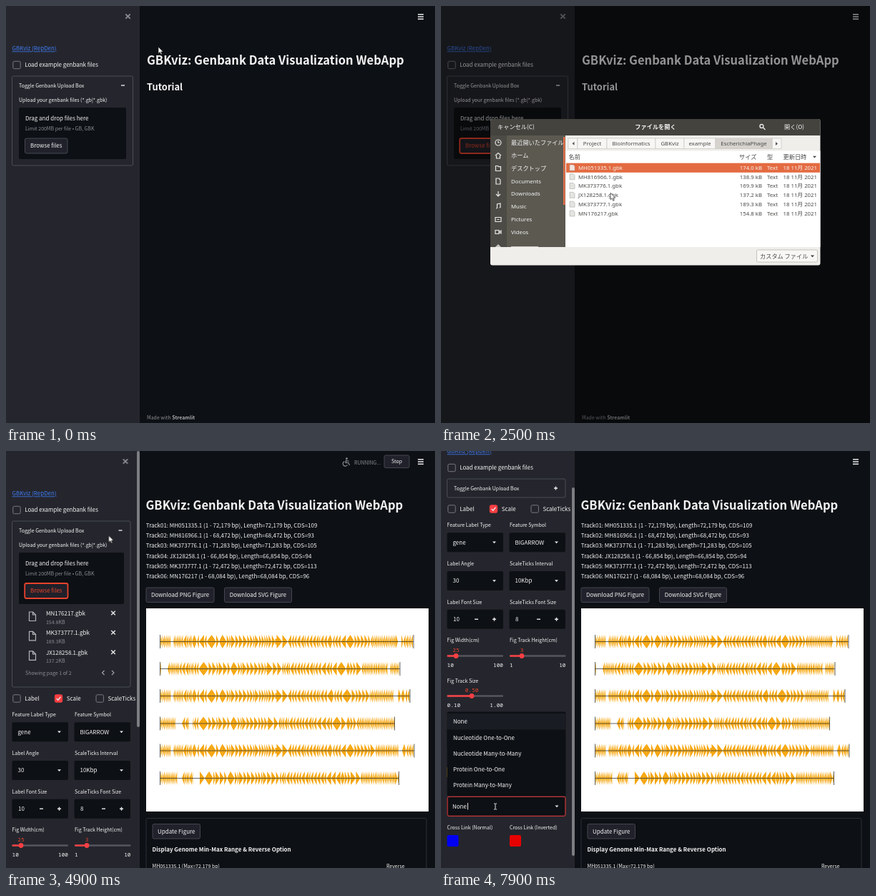
Write an HTML page that moves like this. It is 600 by 583 pixels and loops after 8000 ms.

```html
<!DOCTYPE html>
<html lang="en">
<head>
<meta charset="utf-8">
<title>GBKviz demo</title>
<style>
  html, body { margin: 0; width: 100%; height: 100%; overflow: hidden; background: #0d1014; }
  svg { display: block; width: 600px; height: 583px; }
  text { font: 7.97px "Noto Sans CJK JP", "Noto Sans CJK", "Open Sans", sans-serif; fill: #f4f4f5; white-space: pre; }
  .s { font-size: 6.97px; }
  .h1 { font-size: 16.56px; font-weight: 700; }
  .h2 { font-size: 12.9px; font-weight: 700; }
  .b { font-weight: 700; }
  .dim { fill: #8b8d94; }
  .mono { font: 7.8px "Noto Sans Mono", "DejaVu Sans Mono", monospace; }
  .hot { fill: #e8432c; }
  .link { fill: #3f7df5; text-decoration: underline; }
  .mid { text-anchor: middle; }
  .end { text-anchor: end; }
  .jp { font-size: 8.2px; }
  .ui { font: 7.8px "Noto Sans", "Open Sans", sans-serif; }
  .ink { fill: #4a4a48; }
  .line { fill: none; stroke: #e8e8ea; stroke-width: 1.4; }
</style>
</head>
<body>
<svg id="stage" viewBox="0 0 600 583" xmlns="http://www.w3.org/2000/svg"></svg>
<script>
const LOOP = 8000, DARK = '#0d1014', PANEL = '#25262d', EDGE = '#4b4c55', RED = '#f63f43', PICK = '#e46b41';

// Drawing helpers; text is placed by the middle of its capitals.
const text = (x, y, s, cls = '') => `<text x="${x}" y="${y}" dy=".365em" class="${cls}">${s}</text>`;
const rect = (x, y, w, h, fill, more = '') => `<rect x="${x}" y="${y}" width="${w}" height="${h}" fill="${fill}" ${more}/>`;
const line = (d, more = '') => `<path class="line" d="${d}" ${more}/>`;
const fill = (d, color, more = '') => `<path d="${d}" fill="${color}" ${more}/>`;
const group = (id, ...parts) => `<g id="${id}">${parts.join('')}</g>`;
const cross = (x, y, r, more) => line(`M${x - r} ${y - r}l${2 * r} ${2 * r}m0 ${-2 * r}l${-2 * r} ${2 * r}`, more);
const caret = (x, y, color = '#e8e8ea') => fill(`M${x - 2.5} ${y - 1.2}h5l-2.5 2.8z`, color);
const minus = (x, y) => line(`M${x - 2.5} ${y}h5`);
const plus = (x, y) => line(`M${x - 2.5} ${y}h5m-2.5 -2.5v5`);
const button = (x, y, w, h, label, cls = '') =>
  rect(x, y, w, h, '#20212a', `rx="2" stroke="${EDGE}" stroke-width=".9"`) + text(x + w / 2, y + h / 2, label, cls + ' mid');
const check = (x, y, label, on) =>
  rect(x, y - 5.2, 10.4, 10.4, on ? RED : 'none', `rx="1.8" stroke="${on ? RED : '#777982'}"`) +
  (on ? line(`M${x + 2.5} ${y}l2 2.2 3.6 -4.4`) : '') + text(x + 16.4, y, label);
const select = (x, y, w, label) =>
  rect(x, y - 13.5, w, 27, DARK, 'rx="2"') + text(x + 8, y, label) + caret(x + w - 12.5, y);
const stepper = (x, y, label) =>
  rect(x, y - 13.5, 78.5, 27, DARK, 'rx="2"') + text(x + 8.5, y, label) + minus(x + 41, y) + plus(x + 66, y);
const slider = (x, y, at, value, low, high) =>
  text(at, y - 8.5, value, 'mono mid hot') + rect(x, y - 1.2, 78.5, 2.4, '#55565f', 'rx="1.2"') +
  rect(x, y - 1.2, at - x, 2.4, RED, 'rx="1.2"') + `<circle cx="${at}" cy="${y}" r="3.4" fill="${RED}"/>` +
  text(x, y + 13, low, 'mono') + text(x + 78.5, y + 13, high, 'mono end');
const swatch = (x, y, label, color) => text(x, y, label, 's') + rect(x, y + 10.5, 16, 16, color, 'rx="2"');

function fileRow(y, name, size) {
  return line(`M32.5 ${y - 2}h5l4 4v8.5h-9zM37.5 ${y - 2}v4h4`, 'style="stroke:#b4b5ba;stroke-width:1.2"') +
    text(56, y, name) + text(56, y + 12, size, 's dim') + cross(150, y - .5, 2.8);
}

function sidebar() {
  const left = 8.5, right = 96;
  return group('scroll',
    group('close', cross(170.5, 14.5, 3.2, 'style="stroke:#8a8c94;stroke-width:1.8"')),
    text(left, 59.5, 'GBKviz (RepDen)', 'link'),
    check(9.8, 82.5, 'Load example genbank files'),
    rect(left, 98, 169, 125, 'none', `id="box" rx="2" stroke="${EDGE}"`),
    text(18, 111, 'Toggle Genbank Upload Box', 's'),
    group('open', group('minus', minus(163.5, 111)),
      text(18, 131, 'Upload your genbank files (*.gb|*.gbk)', 's'),
      rect(18, 142, 150, 72, DARK, 'id="drop" rx="2"'),
      text(27, 157, 'Drag and drop files here'),
      text(27, 171.5, 'Limit 200MB per file • GB, GBK', 's dim'),
      button(26.5, 185, 59.5, 21, 'Browse files')),
    group('browse', rect(26.2, 185, 60.3, 21, '#20212a', 'rx="2.5" stroke="#e8432c" stroke-width="1.8"'),
      text(56.3, 195.5, 'Browse files', 'hot mid')),
    group('plus', plus(160.5, 111)),
    group('toggle', text(18, 111, 'Toggle Genbank Upload Box', 's hot')),
    group('files',
      fileRow(227, 'MN176217.gbk', '154.8KB'),
      fileRow(254.3, 'MK373777.1.gbk', '189.3KB'),
      fileRow(281.8, 'JX128258.1.gbk', '137.2KB'),
      text(27, 310, 'Showing page 1 of 2', 's dim'),
      line('M137.5 307l-3 3 3 3M148 307l3 3 -3 3', 'style="stroke:#a6a7ad;stroke-width:1.1"')),
    group('controls',
      check(9.8, 346, 'Label'), check(68.3, 346, 'Scale', true), check(126, 346, 'ScaleTicks'),
      text(left, 368.5, 'Feature Label Type', 's'), text(right, 368.5, 'Feature Symbol', 's'),
      select(left, 392.7, 78.5, 'gene'), select(right - .5, 392.7, 78.5, 'BIGARROW'),
      text(left, 422.5, 'Label Angle', 's'), text(right, 422.5, 'ScaleTicks Interval', 's'),
      select(left, 446.5, 78.5, '30'), select(right - .5, 446.5, 78.5, '10Kbp'),
      text(left, 476, 'Label Font Size', 's'), text(right, 476, 'ScaleTicks Font Size', 's'),
      stepper(left, 500.2, '10'), stepper(right - .5, 500.2, '8'),
      text(left, 529.8, 'Fig Width(cm)', 's'), text(right, 529.8, 'Fig Track Height(cm)', 's'),
      slider(left, 551.5, 21, '25', '10', '100'), slider(right, 551.5, 113, '3', '1', '10'),
      text(left, 586, 'Fig Track Size', 's'), slider(left, 607.5, 43, '0.50', '0.10', '1.00'),
      text(left, 642.3, 'Target Feature Types', 's'),
      rect(left, 652.7, 165.5, 27, DARK, 'rx="2"'), rect(16.5, 659.5, 40, 13.5, RED, 'rx="2"'),
      text(22.5, 666.2, 'CDS', 's'), cross(48.5, 666.2, 2, 'style="stroke-width:1.1"'),
      '<circle cx="152.8" cy="666.2" r="3" fill="#9a9ba1"/>', cross(152.8, 666.2, 1, `style="stroke:${DARK};stroke-width:.8"`),
      caret(162, 666.2),
      swatch(left, 695.5, 'CDS', '#f5a507'), swatch(52, 695.5, 'gene', '#22f2df'),
      swatch(96, 695.5, 'tRNA', '#d3000c'), swatch(140, 695.5, 'misc', '#d300bd'),
      text(left, 737, 'Genome Comparison Type', 's'), select(left - .5, 761.7, 166, 'None'),
      swatch(left, 791.5, 'Cross Link (Normal)', '#0000f2'), swatch(right, 791.5, 'Cross Link (Inverted)', '#e60000')));
}

// Each track: row middle, right end, then empty stretches.
const TRACKS = [
  [266.5, 570, [231, 234], [549, 553]], [304.5, 551, [218, 226], [534, 537]],
  [342.5, 565, [231, 234], [543, 548]], [381, 543.5, [238, 246], [256, 261]],
  [419, 571, [231, 234], [549, 554]], [457.5, 549.5, [241, 246], [264, 271]]];
// Gene stretches along a track: upper limit, direction, mean width.
const GENES = [[.08, -1, 2.3], [.11, -1, 4.5], [.15, -1, 2.4], [.19, -1, 5], [.44, 1, 4.2], [.5, 1, 7],
  [.66, -1, 3.6], [.74, -1, 5], [.83, 1, 5], [2, -1, 2.3]];

function arrow(x, w, dir, y) {
  const base = dir > 0 ? x : x + w, tip = dir > 0 ? x + w : x, neck = tip - dir * Math.min(w, 8);
  return `M${base.toFixed(1)} ${y - 4}H${neck.toFixed(1)}V${y - 9.5}L${tip.toFixed(1)} ${y}L${neck.toFixed(1)} ${y + 9.5}V${y + 4}H${base.toFixed(1)}z`;
}

function track([y, end, ...gaps]) {
  let seed = 11, d = '', x = 215.5;
  const random = () => (seed = seed * 16807 % 2147483647) / 2147483647;
  while (x < end - 1.5) {
    const [, dir, mean] = GENES.find(g => (x - 215) / (end - 215) < g[0]);
    const w = Math.min(mean * (.55 + .9 * random()), end - x), flip = random() < .04 ? -1 : 1;
    const gap = gaps.find(g => x + w > g[0] && x < g[1]);
    if (gap) { x = gap[1]; continue; }
    d += arrow(x, w, dir * flip, y);
    x += w + .1;
  }
  return fill(d, '#f5a60f') +
    `<path d="M215.5 ${y}H${end}M215.5 ${y - 9.5}v19M${end} ${y - 9.5}v19" stroke="#3c3c3c" stroke-width=".8"/>`;
}

function results() {
  const info = [['MH051335.1', '72,179', 109], ['MH816966.1', '68,472', 93], ['MK373776.1', '71,283', 105],
    ['JX128258.1', '66,854', 94], ['MK373777.1', '72,472', 113], ['MN176217', '68,084', 96]];
  return group('results',
    ...info.map(([id, bp, cds], i) =>
      text(195.8, 104 + i * 14.25, `Track0${i + 1}: ${id} (1 - ${bp} bp), Length=${bp} bp, CDS=${cds}`)),
    button(196, 191, 95, 20.5, 'Download PNG Figure'), button(305.5, 191, 94, 20.5, 'Download SVG Figure'),
    rect(196, 220, 395, 284, '#fff'), ...TRACKS.map(track),
    rect(196, 513.5, 392, 90, 'none', 'rx="2" stroke="#2c2e36"'),
    button(205, 521.5, 66.5, 20.5, 'Update Figure'),
    text(204.5, 557.5, 'Display Genome Min-Max Range &amp; Reverse Option', 'b'),
    text(204.5, 580.5, 'MH051335.1 (Max=72,179 bp)', 's'), text(532, 580.5, 'Reverse', 's'));
}

const running = () => group('running',
  line('M476 12.5l-1 4h4l1.5 3.5M475.5 13.5l4 .8M473.5 14.5a3.4 3.4 0 1 0 4 5', 'style="stroke:#8d8f96;stroke-width:1.2"'),
  '<circle cx="476.5" cy="10.6" r="1.4" fill="#8d8f96"/>',
  text(487, 16, 'RUNNING...', 's dim'), button(529, 6, 35, 17.5, 'Stop', 's'));

function dialog() {
  const files = [['MH051335.1', '174.0'], ['MH816966.1', '138.9'], ['MK373776.1', '169.9'],
    ['JX128258.1', '137.2'], ['MK373777.1', '189.3'], ['MN176217', '154.8']];
  const row = (i, on) => {
    const y = 226 + i * 12.78, cls = on ? 'ui' : 'ui ink', [name, size] = files[i];
    return rect(175, y - 6.4, 355, 13.2, on ? PICK : '#fff') +
      fill(`M180 ${y - 4}h5l2 2v6h-7z`, on ? '#f6e4dc' : '#e4e4e2', 'stroke="#aaa9a5" stroke-width=".6"') +
      text(192, y, name + '.gbk', cls) + text(449, y, size + ' kB', cls + ' end') +
      text(456, y, 'Text', cls) + text(526, y, '18 11月 2021', cls + ' end');
  };
  const places = ['最近開いたファイル', 'ホーム', 'デスクトップ', 'Documents', 'Downloads', 'Music', 'Pictures', 'Videos'];
  const icons = ['M84 191a4 4 0 1 0 -8 0a4 4 0 1 0 8 0M80 188.5v2.5h2', 'M76 209l4 -3.5 4 3.5M77.5 209v4h5v-4',
    'M76.5 230.5v-7h3l1 1.2h3v5.8z', 'M77 241h4l2 2v6h-6z', 'M80 259v6.5M77 263l3 3 3 -3',
    'M78.5 283v-6l4.5 -1v6M77 283h1M81.5 282h1', 'M76 295.5h8v6h-8zM78.5 298.5h3', 'M76 313.5h5v5h-5zM81 316l3 -2v4z'];
  const crumbs = [[191, 41, 'Project'], [232, 68, 'Bioinformatics'], [300, 40, 'GBKviz'], [340, 44, 'example'], [384, 79, 'EscherichiaPhage']];
  const edge = 'stroke="#c8c5c0" stroke-width=".7"';
  return group('dialog',
    rect(69, 158, 461.5, 204.5, '#efeeea', 'rx="3"'),
    fill('M69 181V161q0 -3 3 -3H527.5q3 0 3 3V181z', '#45433e'),
    group('accept', rect(467, 158.5, 62, 22, '#353330')),
    text(79, 169.5, 'キャンセル(C)', 'jp'), text(300, 169.5, 'ファイルを開く', 'jp b mid'), text(480, 169.5, '開く(O)', 'jp'),
    line('M451 168a2.5 2.5 0 1 0 -5 0a2.5 2.5 0 1 0 5 0M450.5 170l3 3'),
    rect(69, 181, 23, 156, '#4d4b45'), rect(92, 181, 82, 156, '#5b5950'),
    ...places.map((p, i) => text(98, 191 + i * 17.9, p, i < 3 ? 'jp' : 'ui')),
    line(icons.join(''), 'style="stroke-width:1.2"'),
    fill('M76 337l4 -4 4 4zM98 337v-1h38v1z', '#c9c7c0'),
    group('bar', rect(171, 183, 2.6, 95, '#e2704a')),
    rect(178, 185, 13, 14.5, '#f7f6f4', edge), rect(463, 185, 13, 14.5, '#f7f6f4', edge),
    fill('M186.5 189.8v5l-3 -2.5zM468 190v5l3 -2.5z', '#555'),
    ...crumbs.map(([x, w, s], i) => rect(x, 185, w, 14.5, i === 4 ? '#d6d3ce' : '#f7f6f4', edge) + text(x + w / 2, 192.3, s, 'ui ink mid')),
    rect(174, 202.5, 356.5, 134.5, '#fff'),
    text(178.5, 211, '名前', 'jp ink'), text(417, 211, 'サイズ', 'jp ink'), text(456, 211, '型', 'jp ink'),
    text(478.5, 211, '更新日時', 'jp ink'), caret(522.5, 211, '#444'),
    ...files.map((f, i) => i && row(i, false)).slice(1), row(0, true),
    group('picked', ...files.slice(1).map((f, i) => row(i + 1, true))),
    rect(441.5, 341, 85, 17, '#f8f7f5', 'rx="2" stroke="#bab7b2" stroke-width=".8"'),
    text(446, 349.7, 'カスタム ファイル', 'jp ink'), caret(519.5, 349.7, '#333'));
}

const menu = () => group('menu',
  rect(8.5, 364.5, 166, 118, DARK, 'rx="2"'), rect(8.5, 367, 166, 22.5, '#1a1c23'),
  ...['None', 'Nucleotide One-to-One', 'Nucleotide Many-to-Many', 'Protein One-to-One', 'Protein Many-to-Many']
    .map((s, i) => text(17, 378.3 + i * 22.3, s)),
  rect(9, 483.3, 165, 27, DARK, `rx="2" stroke="${RED}"`), text(16, 496.7, 'None'), caret(162, 496.7),
  rect(37, 492, .9, 9.5, '#f4f4f5'));

const cursor = () => group('cursor',
  group('arrow', fill('M0 0V9.5L2.2 7.5L3.8 11L5.3 10.3L3.8 7H6.8z', '#fff', 'stroke="#111" stroke-width=".7"')),
  group('hand', fill('M-.7 .5q1 -1 1.8 0V4l4.2 1q1 .3 .8 1.3L5.5 9.5H.8L-2 6q.2 -1 1.3 -.2z', '#fff', 'stroke="#111" stroke-width=".6"')),
  group('resize', fill('M-4.8 -4.5h1.6V-.8L-.5 -3.5V-1H5V1H-.5V3.5L-3.2 .8V4.5h-1.6z', '#fff', 'stroke="#111" stroke-width=".6"')),
  group('beam', line('M-2 -4h1.5q.5 0 .5 .5v7q0 .5 -.5 .5H-2M2 -4H.5M2 4H.5', 'style="stroke-width:1"')));

document.getElementById('stage').innerHTML =
  rect(0, 0, 600, 583, DARK) +
  group('title', text(197, 75.5, 'GBKviz: Genbank Data Visualization WebApp', 'h1')) +
  group('tutorial', text(197, 112.8, 'Tutorial', 'h2')) +
  group('footer', text(197, 575, 'Made with <tspan class="b" fill="#a9aaae">Streamlit</tspan>', 's dim')) +
  line('M576 11.7h8M576 15h8M576 18.3h8') +
  results() + running() +
  rect(0, 0, 187, 583, PANEL) + sidebar() +
  rect(183, 0, 4, 386, '#7c7d83', 'id="thumb" rx="2"') + menu() +
  rect(0, 0, 600, 583, '#000', 'id="shade"') +
  dialog() + cursor();

// Keys are [ms, value, hops]: the value holds, or moves to the next key in equal hops.
function play(id, prop, keys) {
  const all = [...keys, [LOOP, keys[keys.length - 1][1]]];
  document.getElementById(id).animate(all.map(([ms, value, hops]) => ({
    offset: ms / LOOP, [prop]: value, easing: hops ? `steps(${hops}, start)` : 'step-end'
  })), { duration: LOOP, iterations: Infinity });
}
// Visible from the first time to the second, from the third to the fourth, and so on.
function show(id, ...times) {
  const keys = times.map((ms, i) => [ms, i % 2 ? 'hidden' : 'visible']);
  play(id, 'visibility', times[0] ? [[0, 'hidden'], ...keys] : keys);
}
const move = (id, ...keys) => play(id, 'transform', keys.map(([ms, x, y, hops]) => [ms, `translate(${x}px, ${y}px)`, hops]));

move('cursor', [0, 213, 57], [300, 213, 57, 2], [500, 130, 106], [600, 130, 106, 4], [1000, 56, 193],
  [1500, 70, 189], [1900, 70, 189, 4], [2300, 240, 224, 5], [2800, 235, 286, 3], [3100, 230, 288, 6], [3700, 486, 167],
  [3800, 486, 167, 5], [4300, 429, 173], [4400, 429, 173, 7], [5100, 96, 109], [5800, 96, 109, 5], [6300, 88, 296],
  [6400, 88, 296, 4], [6800, 75, 525], [7300, 75, 525, 3], [7600, 76, 497]);
show('arrow', 0, 400, 1900, 5000, 5800, 7500);
show('hand', 400, 1500, 5000, 5800);
show('resize', 1500, 1900);
show('beam', 7500);

play('shade', 'opacity', [[0, 0], [1100, 0, 3], [1400, .4], [3800, .4, 3], [4100, 0]]);
show('dialog', 1500, 3800);
show('bar', 1900, 3800);
show('picked', 3000, 3800);
show('accept', 3500, 3800);

show('toggle', 400, 700, 5000, 5800);
show('browse', 900, 5400);
show('open', 0, 5700);
show('plus', 5700);
show('files', 4000, 5700);
show('controls', 4000);
move('controls', [0, 0, 0], [5700, 0, -199], [5800, 0, -206]);
play('box', 'height', [[0, '125px'], [4000, '232px'], [5700, '33px'], [5800, '26px']]);
play('box', 'width', [[0, '169px'], [4000, '165.5px']]);
play('drop', 'width', [[0, '150px'], [4000, '147px']]);
for (const id of ['close', 'minus']) move(id, [0, 0, 0], [4000, -3.5, 0]);

show('running', 4000, 5000);
show('tutorial', 0, 4600);
show('footer', 0, 4600);
show('results', 4600);
move('title', [0, 0, 0], [4600, -1.5, 0]);

show('thumb', 4400);
play('thumb', 'height', [[0, '386px'], [5700, '510px'], [5800, '515px']]);
move('scroll', [0, 0, 0], [7000, 0, 0, 2], [7200, 0, -35], [7300, 0, -35, 3], [7600, 0, -59]);
move('thumb', [0, 0, 0], [7000, 0, 0, 2], [7200, 0, 30], [7300, 0, 30, 3], [7600, 0, 51]);
show('menu', 7700);
</script>
</body>
</html>
```
